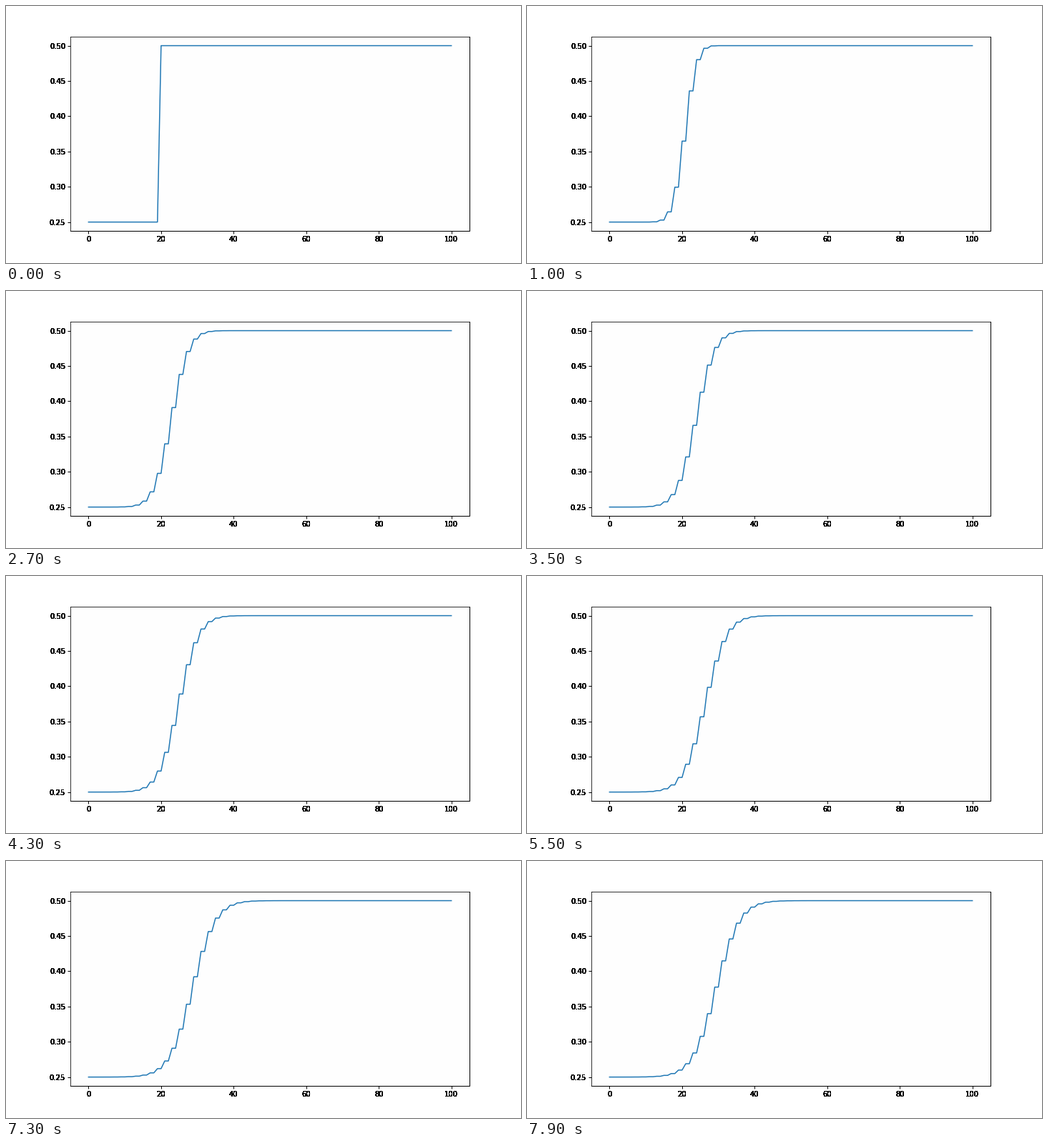
Write a matplotlib script that moves like this. It is 720 px wide and 360 px high and loops after 8000 ms.

```python
import numpy as np
import matplotlib.pyplot as plt
from matplotlib.animation import FuncAnimation

FRAMES = 80
INTERVAL = 100
CFL = 0.5          # dt / dx
TEXT_LAYERS = 16   # overprinting hardens the glyph edges


def flux(u):
    """Traffic flow: density times velocity."""
    return u * (1 - u)


def step(u):
    """One Lax-Friedrichs step with fixed end values."""
    new = u.copy()
    left, right = u[:-2], u[2:]
    new[1:-1] = (left + right) / 2 - CFL / 2 * (flux(right) - flux(left))
    return new


x = np.arange(101)
history = [np.where(x < 20, 0.25, 0.5)]
while len(history) < FRAMES:
    history.append(step(history[-1]))

plt.rcParams.update({"font.family": "DejaVu Sans", "font.size": 10})
fig, ax = plt.subplots(figsize=(10, 5), dpi=72)
fig.subplots_adjust(bottom=0.125)
ax.set_facecolor("#fefefe")
line, = ax.plot(x, history[0], color="#1f77b4", lw=1.5)
ax.set_xlim(-5, 105)
ax.set_ylim(0.2375, 0.5125)

xticks = np.arange(0, 101, 20)
yticks = np.arange(0.25, 0.51, 0.05)
ax.set_xticks(xticks, [])
ax.set_yticks(yticks, [])
ax.tick_params(width=1, length=4)
for side in ("right", "bottom"):
    ax.spines[side].set_linewidth(1)


def label(pos, text, placement):
    transform, va, ha = placement
    for _ in range(TEXT_LAYERS):
        ax.text(*pos, text, transform=transform, va=va, ha=ha)


for t in xticks:
    label((t, 0), f"{t}", ax.get_xaxis_text1_transform(7))
for t in yticks:
    label((0, t), f"{t:.2f}", ax.get_yaxis_text1_transform(7))


def update(i):
    line.set_ydata(history[i])
    return line,


anim = FuncAnimation(fig, update, frames=FRAMES, interval=INTERVAL,
                     repeat=True, repeat_delay=0, blit=False)
plt.show()
```
